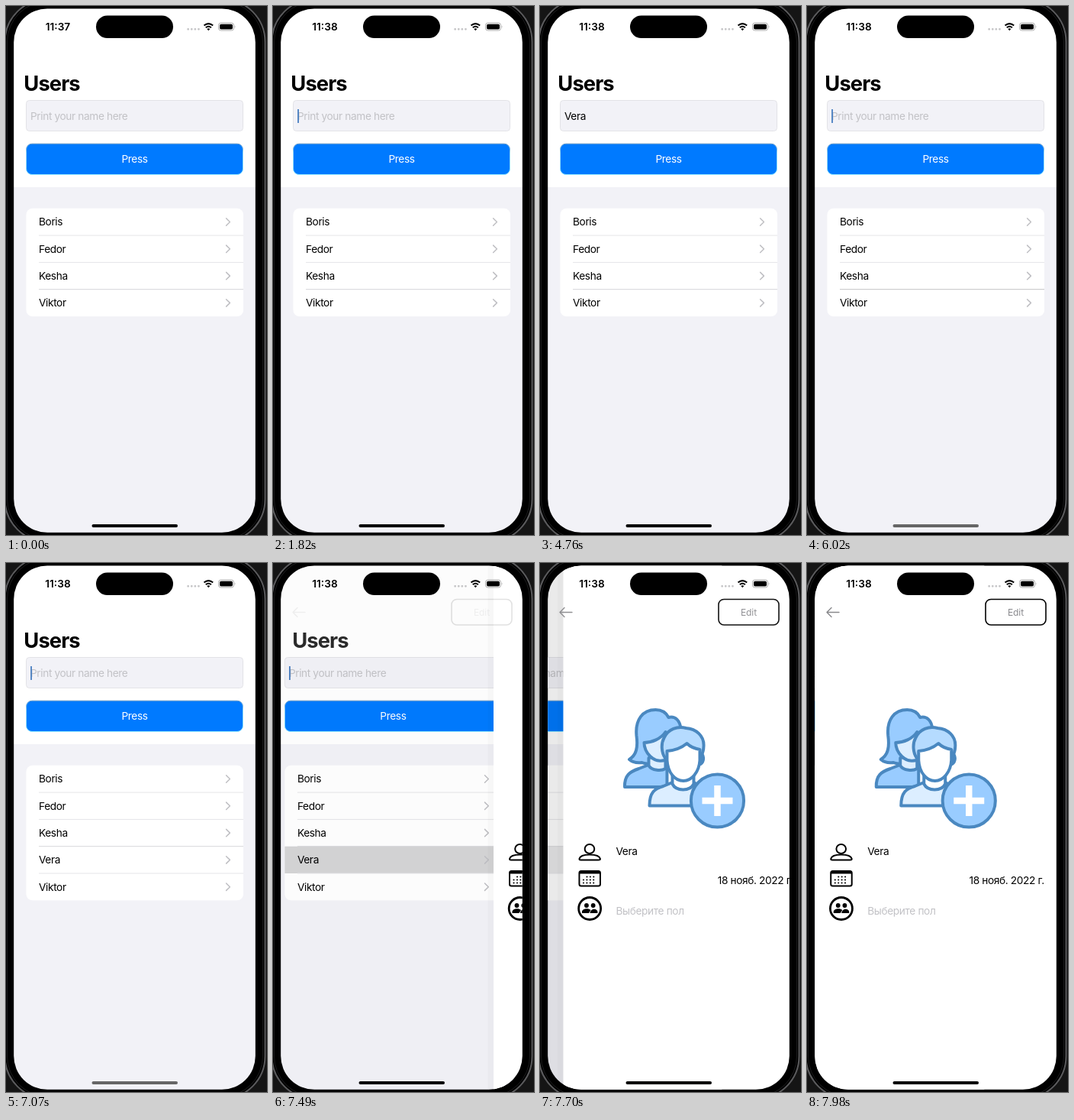
Recreate the animation shown at these times as an HTML page. Size 342 by 692 pixels, loop 8000 ms.

```html
<!DOCTYPE html>
<html lang="en">
<head>
<meta charset="utf-8">
<title>User list</title>
<style>
  html, body { margin: 0; width: 100%; height: 100%; overflow: hidden; background: #000; }
  svg { display: block; width: 342px; height: 692px; }
  text { font: 400 13.7px Inter, "Liberation Sans", sans-serif; letter-spacing: -.38px; white-space: pre; }
  .title { font-weight: 700; font-size: 27.3px; letter-spacing: -.9px; }
  .clock { font-weight: 600; letter-spacing: 0; }
  .edit { font-size: 12px; letter-spacing: -.1px; }
  .hint { fill: #c2c2c6; }
  .mid { text-anchor: middle; }
  .end { text-anchor: end; }
  .line { fill: none; stroke-linecap: round; stroke-linejoin: round; }
  .art { stroke: #4a88c0; stroke-width: 4; stroke-linejoin: round; }
  .sky { fill: #99ccff; }
  .light { fill: #b5dbff; }
  .pale { fill: #dceeff; }
</style>
</head>
<body>
<svg viewBox="0 0 342 692">
  <defs>
    <clipPath id="screen"><rect x="10.2" y="3.4" width="316.6" height="685.4" rx="44"/></clipPath>
    <linearGradient id="rim" x2="0" y2="1">
      <stop stop-color="#6a9cc8"/><stop offset=".3" stop-color="#9fdcf8"/><stop offset="1" stop-color="#8fe6ff"/>
    </linearGradient>
  </defs>

  <!-- phone body -->
  <rect width="342" height="692" fill="#151515"/>
  <rect x="-1.5" y="-9" width="341" height="710" rx="56" fill="#000" stroke="#5b5b5d" stroke-width="2"/>
  <rect x="1.5" y="-6" width="335" height="704" rx="53" fill="none" stroke="#1d1d1e"/>

  <g clip-path="url(#screen)">
    <g id="listPage">
      <rect x="10" y="3" width="317" height="234" fill="#fff"/>
      <rect x="10" y="237" width="317" height="453" fill="#f2f2f7"/>
      <rect x="26.5" y="123.5" width="284" height="40" rx="4" fill="#f2f2f7" stroke="#e3e3e7"/>
      <text id="hint" class="hint" x="32" y="149">Print your name here</text>
      <text id="typed" x="32" y="149"></text>
      <rect id="caret" y="135" width="1.7" height="18" fill="#3f78bd"/>
      <rect x="26.5" y="180.2" width="284" height="40.3" rx="7.5" fill="#007aff" stroke="url(#rim)"/>
      <text class="mid" x="168.5" y="205.2" fill="#fff">Press</text>
      <rect id="card" x="26.5" y="264.8" width="284.5" rx="8" fill="#fff"/>
      <rect id="pressed" x="26.5" y="370.7" width="284.5" height="35.3" fill="#d4d4d6"/>
      <g id="rows"></g>
    </g>
    <rect id="dim" x="10" y="3" width="317" height="687"/>

    <g id="profile">
      <rect x="2.5" y="3" width="8" height="687" opacity=".02"/>
      <rect x="10" y="3" width="317" height="687" fill="#fff"/>

      <!-- woman -->
      <g class="art">
        <path class="sky" d="M90.500 293C90 278 97 273 109 269L122 264H146V293Z"/>
        <path class="sky" d="M96.500 257C106 251 108 241 106 226C104 205 114 192 131 192C139 192 145 196 148 202C157 200 163 206 164 217L150 262C137 263 120 264 113 261C106 262 100 260 96.500 257Z"/>
        <path class="pale" d="M122 255V265C126 272 139 272 144 269V250Z"/>
        <path class="pale" d="M116 235C126 235 138 230 144 221L150 228V254C142 261 131 260 124 253C119 248 116 242 116 235Z"/>
      </g>
      <!-- man -->
      <g class="art">
        <path class="pale" d="M123 317.500C123 300 130 295 141 292L153 287H181L200 298V317.500Z"/>
        <path fill="#fff" d="M153 277V289C158 299 176 299 181 289V277Z"/>
        <path class="light" d="M189 248C195 251 195 259 190 263Z"/>
        <path class="light" d="M145 257C138 249 138 236 142 229C147 217 160 213 171 216C184 217 195 226 194 240C194 246 192 251 189 257Z"/>
        <path fill="#fff" d="M146 246C157 245 166 241 172 236C177 241 183 243 189 244V258C188 274 178 285 167.500 285C156 285 147 274 146 258Z"/>
      </g>
      <circle class="art sky" cx="212" cy="311" r="34.600"/>
      <path d="M192 311H232M212 291V331" stroke="#fff" stroke-width="8.500"/>

      <!-- field icons -->
      <g class="line" stroke="#000" stroke-width="2">
        <ellipse cx="44.500" cy="374" rx="6.300" ry="6"/>
        <path d="M31 387C32 383 38 381.500 44.500 381.500S57.500 383 58.500 387Q58.500 388.500 56 388.500H33Q31 388.500 31 387Z"/>
        <rect x="31" y="403" width="27.500" height="19.500" rx="2.500"/>
        <path d="M31.500 404.800H58" stroke-width="3.500" stroke-linecap="butt"/>
        <path d="M41 410.500H54M36.500 414.500H54M36.500 418.500H50" stroke-dasharray=".1 4.300"/>
        <circle cx="44.700" cy="452" r="14.500" stroke-width="2.800"/>
      </g>
      <circle cx="40.500" cy="448" r="2.900"/>
      <circle cx="49.200" cy="448" r="2.900"/>
      <path d="M34.500 458V456C35 452 43 451 46 454L43.500 458ZM45 458C46 451 54.500 451.500 55 456V458Z"/>
      <text x="79" y="382.300">Vera</text>
      <text class="end" x="310.500" y="419.800">18 нояб. 2022 г.</text>
      <text class="hint" x="79" y="460.300">Выберите пол</text>
    </g>

    <!-- navigation bar -->
    <text id="title" class="title" x="23.300" y="111">Users</text>
    <g id="nav">
      <path class="line" d="M42 64.500H26M32 58.500L26 64.500L32 70.500" stroke="#89898c" stroke-width="1.400"/>
      <rect x="234" y="47.500" width="79" height="33.500" rx="7" fill="none" stroke="#000" stroke-width="1.600"/>
      <text class="edit mid" x="273.500" y="68.700" fill="#8a8a8e">Edit</text>
    </g>

    <!-- status bar -->
    <text id="clock" class="clock mid" x="68" y="32"></text>
    <rect x="118" y="12.500" width="101" height="29.500" rx="14.750"/>
    <path class="line" d="M238.600 30.300H252.500" stroke="#c6c6c8" stroke-width="2.800" stroke-dasharray=".1 4.500"/>
    <path d="M259.500 25.500Q265.300 20.800 271.200 25.500M261.800 28.200Q265.300 25.300 268.900 28.200" fill="none" stroke="#000" stroke-width="2.100"/>
    <path d="M263.300 30Q265.300 28.600 267.300 30L265.300 32.200Z"/>
    <rect x="278.500" y="22.200" width="20" height="9.800" rx="3" fill="none" stroke="#aaa"/>
    <rect x="280" y="23.700" width="17" height="6.800" rx="1.800"/>
    <path d="M299.800 25.500Q301.500 27 299.800 28.700Z" fill="#aaa"/>
    <rect id="home" x="112.500" y="678" width="112.500" height="4" rx="2"/>
  </g>
</svg>
<script>
const LOOP = 8000, TICK = 70, ROW = 35.3, TOP = 264.8, WIDTH = 316;
const $ = id => document.getElementById(id);
const set = (el, attrs) => { for (const k in attrs) el.setAttribute(k, attrs[k]); };
const clamp = v => Math.max(0, Math.min(1, v));
const ramp = (t, a, b) => clamp((t - a) / (b - a));

const rows = ["Boris", "Fedor", "Kesha", "Vera", "Viktor"].map((name, i) => {
  const g = document.createElementNS("http://www.w3.org/2000/svg", "g");
  g.innerHTML = `<text x="43" y="22.700">${name}</text>
    <path class="line" d="M288.600 13L293.400 17.700L288.600 22.400" stroke="#bfbfc3" stroke-width="1.500"/>
    ${i ? '<path d="M43 0H311" stroke="#e5e5e8"/>' : ""}`;
  $("rows").append(g);
  return g;
});

// [time, text in the field]
const typing = [[0, ""], [2870, "V"], [3010, "Ve"], [3360, "Ver"], [3920, "Vera"], [6020, ""]];

// [start, end, opacity at end]
const blinks = [
  [1820, 1820, 1], [2450, 2590, 0], [2870, 2870, 1], [4550, 4760, 0], [4900, 5110, 1],
  [5600, 5740, 0], [6020, 6020, 1], [6510, 6720, 0], [6930, 7070, 1]
];

function caretOpacity(t) {
  let value = 0;
  for (const [a, b, to] of blinks) {
    if (t >= a) value += (to - value) * (b > a ? ramp(t, a, b) : 1);
  }
  return value;
}

// critically damped spring
function push(t) {
  if (t < 7490) return 0;
  const x = 18.3 * (t - 7458) / 1000;
  return 1 - (1 + x) * Math.exp(-x);
}

function drawList(t) {
  const x = ramp(t, 6020, 6300), grow = x * x * (3 - 2 * x);
  rows.forEach((row, i) => {
    const slot = i < 4 ? i : 3 + grow;
    set(row, { transform: `translate(0 ${TOP + slot * ROW})`, opacity: i === 3 ? grow : 1 });
  });
  const busy = t >= 6020 && t < 6300;
  set(rows[4].lastElementChild, { stroke: busy ? "#c3c3c6" : grow ? "#e5e5e8" : "#d6d6d9" });
  set(rows[3].lastElementChild, { stroke: "#d8d8db" });
  set($("card"), { height: ROW * (4 + grow) });
  set($("pressed"), { opacity: t >= 7350 ? 1 - ramp(t, 7560, 7840) : 0 });
}

function drawField(t) {
  const text = typing.filter(([at]) => t >= at).pop()[1];
  $("typed").textContent = text;
  set($("hint"), { opacity: text ? 0 : 1 });
  const end = text ? $("typed").getBBox().width : 0;
  set($("caret"), { x: 32.2 + end, opacity: caretOpacity(t) });
}

function drawPush(t) {
  const p = push(t);
  set($("listPage"), { transform: `translate(${-0.3 * WIDTH * p} 0)` });
  set($("profile"), { transform: `translate(${WIDTH * (1 - p)} 0)`, opacity: p ? 1 : 0 });
  set($("dim"), { opacity: 0.09 * p });
  set($("title"), { transform: `translate(${16 * p} 0)`, opacity: clamp(1 - 1.43 * p) });
  set($("nav"), { opacity: p });
}

function draw(now) {
  const t = Math.floor((now % LOOP) / TICK) * TICK;
  $("clock").textContent = t < 1820 ? "11:37" : "11:38";
  set($("home"), { fill: t >= 6020 && t < 7490 ? "#666" : "#000" });
  drawList(t);
  drawField(t);
  drawPush(t);
}

const start = performance.now();
function frame() {
  draw(performance.now() - start);
  requestAnimationFrame(frame);
}
frame();
</script>
</body>
</html>
```
